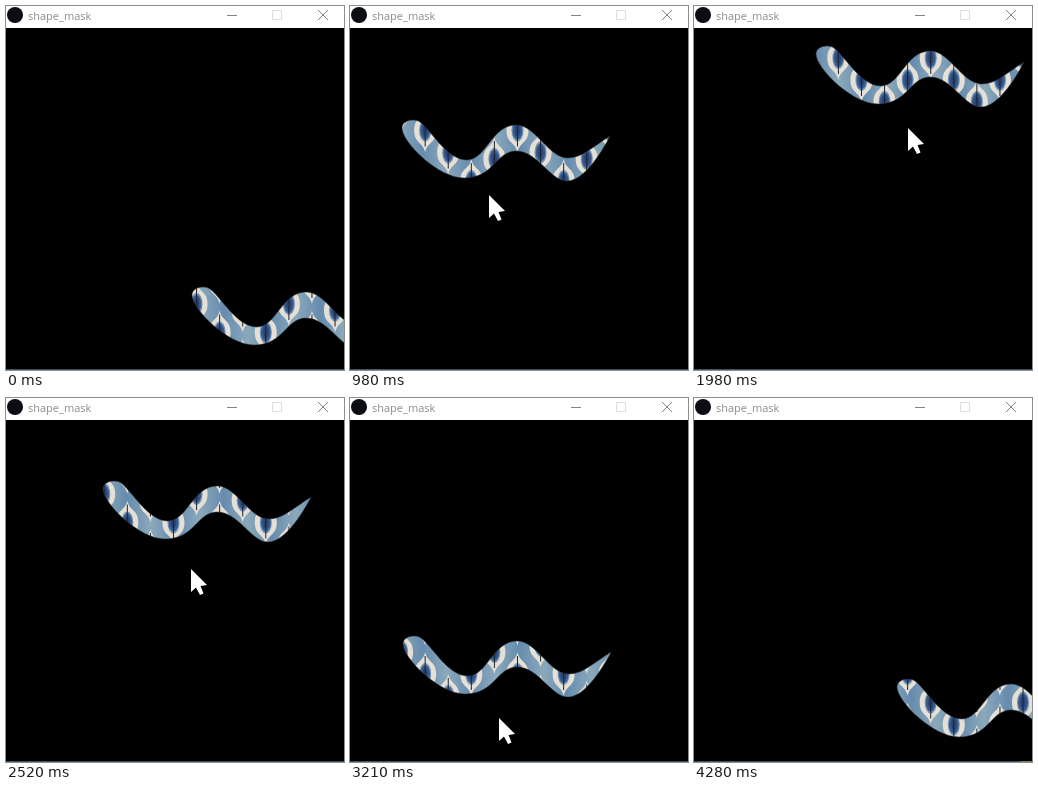
Animation of 338x364 px, one loop 4.45 s. Source, as an HTML page with a canvas:

```html
<!DOCTYPE html>
<html lang="en">
<head>
<meta charset="utf-8">
<title>shape_mask</title>
<style>
  html, body { margin: 0; width: 100%; height: 100%; overflow: hidden; background: #000; }
  canvas { display: block; position: absolute; left: 0; top: 0; }
  header { position: absolute; left: 0; top: 0; width: 338px; height: 22px; background: #fff; }
  header span {
    position: absolute; left: 22px; top: 2px;
    font: 11px/16px "Open Sans", "Noto Sans", sans-serif; color: #8c8c8c;
  }
  header svg { position: absolute; left: 0; top: 0; }
</style>
</head>
<body>
<canvas id="stage" width="338" height="364"></canvas>
<header>
  <svg width="338" height="22" fill="none" stroke="#808080">
    <circle cx="9" cy="9" r="8" fill="#0b0d12" stroke="none"/>
    <path d="M221 9.5H231"/>
    <path d="M266.5 4.5H275.5V13.5H266.5Z" stroke="#dedede"/>
    <path d="M312 4L322 14M322 4L312 14"/>
  </svg>
  <span>shape_mask</span>
</header>
<script>
const W = 338, H = 364, LOOP = 4450, TICK = 76.67;
const ctx = document.getElementById('stage').getContext('2d');

const worm = new Path2D(`M0 8C0 3 5 0 11 0C17 0 20 3 26 10C38 24 50 40 65 40
  C84 40 90 5 114 5C134 5 146 38 166 38C180 38 192 26 208 16C202 28 183 61 165 61
  C148 61 136 31 114 31C94 31 92 58 62 58C36 58 0 22 0 8Z`);
const pointer = new Path2D('M0 0V23L5 18.5L9 26L12.5 24.5L9.5 17L16 16Z');

// Two sweeps of the mouse. Points hold the tick, the place and the velocity per tick.
const sweeps = [
  { start: 133, points: [
    { k: 0, at: [186, 281], v: [0, 0] },
    { k: 6, at: [168, 218], v: [-28, -15] },
    { k: 16, at: [18, 33], v: [5, -6] },
    { k: 24, at: [122, 40], v: [24, 1] }
  ] },
  { start: 2283, points: [
    { k: 0, at: [122, 40], v: [0, 0] },
    { k: 8, at: [33, 206], v: [-5, 14] },
    { k: 16, at: [133, 243], v: [25, 1] },
    { k: 20, at: [203, 281], v: [0, 0] }
  ] }
];

// Cubic Hermite curve through the points, at rest before and after them
function position(points, k) {
  k = Math.max(0, Math.min(k, points.at(-1).k));
  const next = Math.max(1, points.findIndex(p => p.k >= k));
  const a = points[next - 1], b = points[next];
  const span = b.k - a.k, u = (k - a.k) / span, w = 1 - u;
  return [0, 1].map(i =>
    a.at[i] * w * w * (1 + 2 * u) + b.at[i] * u * u * (1 + 2 * w) +
    span * u * w * (a.v[i] * w - b.v[i] * u));
}

// Pointed oval with a bulging waist
function leaf(g, x, y, w, h, color) {
  g.fillStyle = color;
  g.beginPath();
  g.moveTo(x, y - h);
  g.bezierCurveTo(x + w * .2, y - h * .5, x + w, y - h * .6, x + w, y);
  g.bezierCurveTo(x + w, y + h * .6, x + w * .2, y + h * .5, x, y + h);
  g.bezierCurveTo(x - w * .2, y + h * .5, x - w, y + h * .6, x - w, y);
  g.bezierCurveTo(x - w, y - h * .6, x - w * .2, y - h * .5, x, y - h);
  g.fill();
}

function oval(g, x, y, rx, ry, color) {
  g.fillStyle = color;
  g.beginPath();
  g.ellipse(x, y, rx, ry, 0, 0, 2 * Math.PI);
  g.fill();
}

// Woven cloth: columns of eyes whose height swings from column to column
function makeFabric() {
  const canvas = document.createElement('canvas');
  canvas.width = W;
  canvas.height = H;
  const g = canvas.getContext('2d');
  const pitch = 23.08, repeat = 50.5;

  const ground = g.createLinearGradient(0, 0, W, 0);
  for (let i = 0; i <= 14; i++) ground.addColorStop(i / 14, i % 2 ? '#668bae' : '#8aa9bb');
  g.fillStyle = ground;
  g.fillRect(0, 0, W, H);

  for (let col = -1; col < 14; col++) {
    const x = 29 + pitch * col;
    const first = 74 - 22 * Math.sin(col * Math.PI / 2) - 2 * repeat;
    for (let y = first; y < H + repeat; y += repeat) {
      leaf(g, x, y, 11, 22, '#e5dfd6');
      oval(g, x, y, 6, 11, '#6d92b5');
      oval(g, x, y, 4.8, 9, '#365788');
      oval(g, x, y, 2.5, 6, '#2a4272');
      g.fillStyle = '#1c2434';
      g.fillRect(x - .5, y - 18, 1, 34);
    }
  }
  return canvas;
}

const fabric = ctx.createPattern(makeFabric(), 'no-repeat');

function draw(t) {
  const { start, points } = sweeps[t < 2356 ? 0 : 1];
  const k = Math.floor((t + 4 - start) / TICK);
  const [x, y] = position(points, k).map(Math.round);
  // The pointer runs slightly ahead of the worm
  const ahead = position(points, k + .28);
  const px = Math.round(ahead[0] + 92), py = Math.round(ahead[1] + 81.5);

  ctx.fillStyle = '#000';
  ctx.fillRect(0, 0, W, H);

  ctx.save();
  const shape = new Path2D();
  shape.addPath(worm, new DOMMatrix([1, 0, 0, 1, x, y]));
  ctx.fillStyle = fabric;
  ctx.fill(shape);
  ctx.strokeStyle = 'rgba(45, 50, 55, .5)';
  ctx.stroke(shape);

  if (py < 362) {
    ctx.translate(px, py);
    ctx.fillStyle = '#fff';
    ctx.fill(pointer);
  }
  ctx.restore();

  ctx.fillStyle = '#3e5267';
  ctx.fillRect(0, 363, W, 1);
  if (t >= 4280) {
    ctx.fillStyle = '#85824f';
    ctx.fillRect(327, 363, 10, 1);
  }
}

function frame() {
  draw(performance.now() % LOOP);
  requestAnimationFrame(frame);
}
frame();
</script>
</body>
</html>
```
